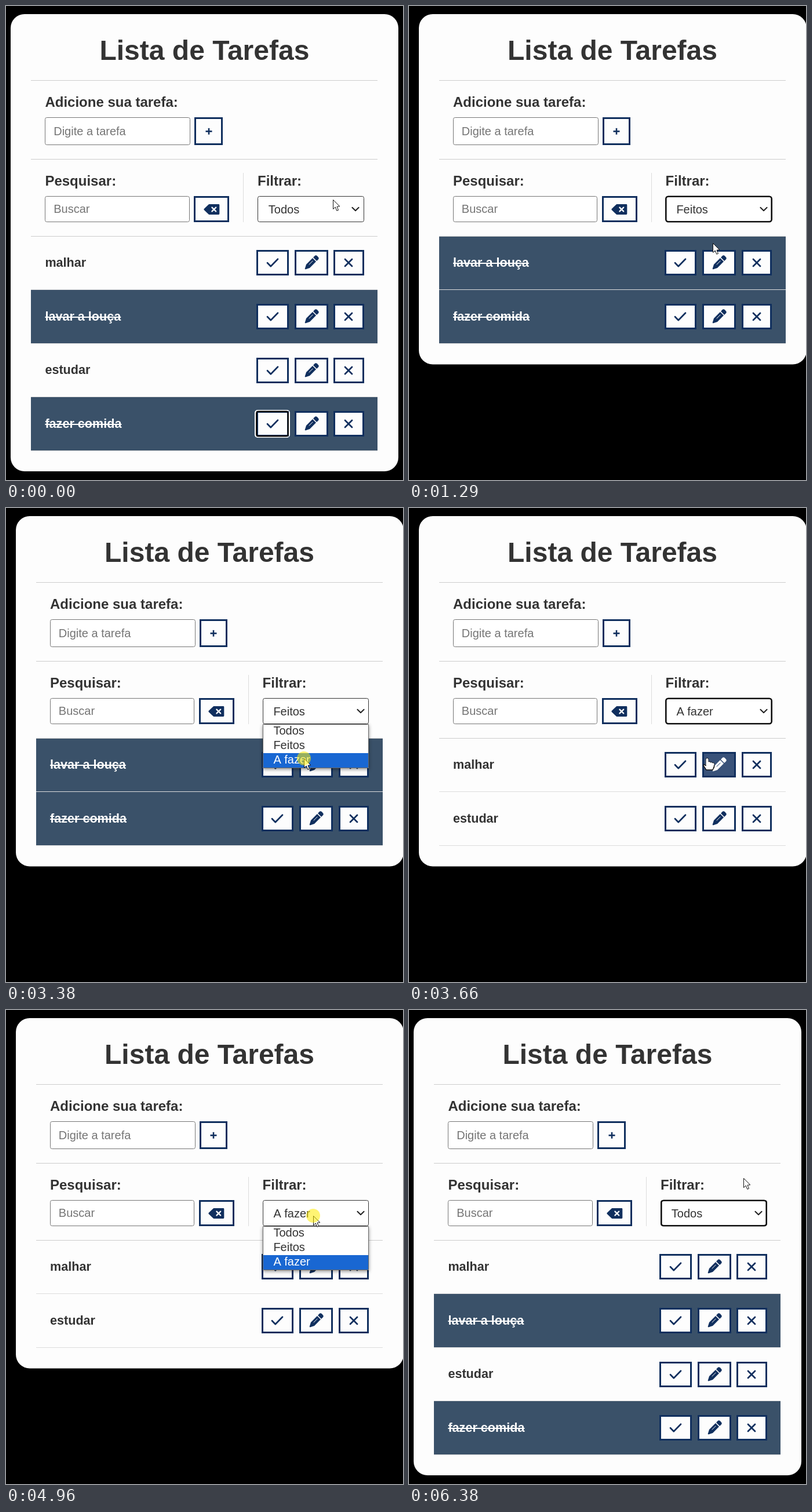
These frames come from a looping animation (685 by 818 pixels, 6.98 s). An HTML page with a canvas:

```html
<!DOCTYPE html>
<html lang="pt-BR">
<head>
<meta charset="utf-8">
<title>Lista de Tarefas</title>
<style>
  html, body { margin: 0; width: 100%; height: 100%; overflow: hidden; background: #000; }
  canvas { display: block; }
</style>
</head>
<body>
<canvas id="stage" width="685" height="818"></canvas>
<script>
const ctx = document.getElementById('stage').getContext('2d');
const LOOP = 6980;
const NAVY = '#102f5e', PAPER = '#fdfdfd', INK = '#333', DONE = '#3a5169';
const FONT = '"Liberation Sans", Arial, sans-serif';
const FILTERS = ['Todos', 'Feitos', 'A fazer'];
const TASKS = [
  { name: 'malhar', done: false },
  { name: 'lavar a louça', done: true },
  { name: 'estudar', done: false },
  { name: 'fazer comida', done: true }
];

// Selected filter from a given time, and the spans in which things are visible.
const SELECTIONS = [[0, 0], [1290, 1], [3450, 2], [5890, 0]];
const MENU_OPEN = [[350, 1290], [2360, 3450], [4960, 5890]];
const CLICKS = [[350, 420], [1160, 1290], [2360, 2430], [3380, 3450], [4960, 5020], [5760, 5890]];
const HOVER_IN = 3450, HOVER_OUT = 4150, FADE = 400;

const START = { x: 564, y: 334 };
const MOVES = [
  { from: 70, to: 280, steps: 4, x: 556, y: 352 },
  { from: 420, to: 750, steps: 6, x: 538, y: 388 },
  { from: 820, to: 960, steps: 3, x: 524, y: 409 },
  { from: 1820, to: 2290, steps: 8, x: 533, y: 355 },
  { from: 2700, to: 3310, steps: 9, x: 514, y: 432 },
  { from: 4070, to: 4340, steps: 5, x: 529, y: 391 },
  { from: 4410, to: 4690, steps: 5, x: 530, y: 355 },
  { from: 5220, to: 5430, steps: 4, x: 527, y: 394 },
  { from: 5890, to: 6380, steps: 8, x: 577, y: 290 }
];

const within = (spans, t) => spans.some(([a, b]) => t >= a && t < b);
const clamp = v => Math.max(0, Math.min(1, v));
const ease = p => 1 - Math.pow(1 - clamp(p), 2.3);

function cursorAt(t) {
  let { x, y } = START;
  for (const m of MOVES) {
    if (t < m.from) break;
    const step = Math.floor((t - m.from) / (m.to - m.from) * (m.steps - 1) + 0.15) + 1;
    const p = clamp(step / m.steps);
    x += (m.x - x) * p;
    y += (m.y - y) * p;
  }
  return { x, y };
}

// The centred card moves sideways when the page scrollbar goes away.
let shift = 0;
const X = x => Math.round(x + shift);

function fill(x, y, r, b, color) {
  ctx.fillStyle = color;
  ctx.fillRect(X(x), y, X(r) - X(x), b - y);
}

function frame(x, y, r, b, width, color, radius = 0, bg) {
  const h = width / 2;
  ctx.beginPath();
  ctx.roundRect(X(x) + h, y + h, X(r) - X(x) - width, b - y - width, radius);
  if (bg) { ctx.fillStyle = bg; ctx.fill(); }
  ctx.lineWidth = width;
  ctx.strokeStyle = color;
  ctx.stroke();
}

function text(str, x, y, size, color = INK, weight = 'normal', align = 'left') {
  ctx.font = `${weight} ${size}px ${FONT}`;
  ctx.textAlign = align;
  ctx.fillStyle = color;
  ctx.fillText(str, x + shift, y);
}

function trace(points, close) {
  ctx.beginPath();
  points.forEach(([x, y]) => ctx.lineTo(x, y));
  if (close) ctx.closePath();
}

function lines(width, color, ...paths) {
  ctx.lineWidth = width;
  ctx.strokeStyle = color;
  ctx.lineCap = ctx.lineJoin = 'round';
  for (const p of paths) { trace(p); ctx.stroke(); }
  ctx.lineCap = 'butt';
  ctx.lineJoin = 'miter';
}

function at(x, y, draw) {
  ctx.save();
  ctx.translate(x, y);
  draw();
  ctx.restore();
}

const checkIcon = color => lines(2.7, color, [[-9, 0.3], [-3.2, 6.2], [9, -6.2]]);
const crossIcon = (color, r = 6, w = 2.8) =>
  lines(w, color, [[-r, -r], [r, r]], [[r, -r], [-r, r]]);

function pencilIcon(color, bg) {
  ctx.rotate(Math.PI / 4);
  ctx.fillStyle = color;
  ctx.beginPath();
  ctx.roundRect(-4.3, -15.2, 8.6, 6.6, [3, 3, 0, 0]);
  ctx.fill();
  trace([[-4.3, -7], [4.3, -7], [4.3, 8.4], [0.7, 15.4], [-0.7, 15.4], [-4.3, 8.4]], true);
  ctx.fill();
  lines(0.9, bg, [[-0.6, -3.5], [-0.6, 5]]);
}

function backspaceIcon() {
  const body = [[-12.3, 0], [-4.5, -7.6], [12, -7.6], [12, 7.6], [-4.5, 7.6], [-12.3, 0]];
  lines(2.6, NAVY, body);
  trace(body, true);
  ctx.fillStyle = NAVY;
  ctx.fill();
  at(3.8, 0, () => crossIcon(PAPER, 3.4, 2.2));
}

function header() {
  text('Lista de Tarefas', 342.4, 93, 48, INK, 'bold', 'center');
  for (const y of [128, 264, 397]) fill(43.4, y, 641.4, y + 1, '#ccc');
  fill(409.4, 288, 410.4, 373, '#ddd');

  text('Adicione sua tarefa:', 67.4, 174, 24, INK, 'bold');
  frame(67.4, 192, 318.2, 240, 1, '#767676', 3, '#fff');
  text('Digite a tarefa', 82.2, 223, 20, '#757575');
  frame(325, 192, 373.6, 240, 3, NAVY, 0, PAPER);
  at(X(349.6), 216, () => {
    ctx.fillStyle = NAVY;
    ctx.fillRect(-5.5, -1, 11, 2.6);
    ctx.fillRect(-1.3, -5.2, 2.6, 11);
  });

  text('Pesquisar:', 67.4, 310, 24, INK, 'bold');
  frame(67.4, 328, 316.8, 373, 1, '#767676', 3, '#fff');
  text('Buscar', 82.2, 357, 20, '#757575');
  frame(324, 328, 385.2, 373, 3, NAVY, 0, PAPER);
  at(X(354.8), 351, backspaceIcon);

  text('Filtrar:', 434, 310, 24, INK, 'bold');
}

function selectBox(label, focused) {
  frame(434, 328, 617.8, 373, 1, '#333', 3, '#fff');
  if (focused) frame(433.6, 327.5, 618.2, 373.5, 2.6, '#101010', 4);
  text(label, 452.8, 358, 20);
  at(X(603.4), 350.5, () => lines(2, '#222', [[-5.6, -2.8], [0, 2.8], [5.6, -2.8]]));
}

function menu(active) {
  ctx.save();
  ctx.shadowColor = 'rgba(0,0,0,.45)';
  ctx.shadowBlur = 6;
  ctx.shadowOffsetY = 2;
  fill(434, 373, 617.4, 449, '#fff');
  ctx.restore();
  frame(434, 373, 617.4, 449, 1, '#666');
  FILTERS.forEach((name, i) => {
    const y = 374 + Math.round(24.7 * i);
    if (i === active) fill(435, y, 616.4, y + 25, '#1967d2');
    text(name, 452.8, 391 + 25 * i, 20, i === active ? '#fff' : INK);
  });
}

function taskRow(task, i, hover, hovered, focusRing) {
  const bottom = Math.floor(489.9 + 92.5 * i);
  const top = i ? Math.floor(397.4 + 92.5 * i) + 1 : 398;
  if (task.done) fill(43.4, top, 641.4, bottom, DONE);
  fill(43.4, bottom, 641.4, bottom + 1, '#ddd');

  const base = Math.round(450 + 92.6 * i);
  text(task.name, 67.4, base, 21.6, task.done ? PAPER : INK, 'bold');
  if (task.done) {
    const width = ctx.measureText(task.name).width;
    ctx.fillRect(67.4 + shift, base - 7, width, 2);
  }

  const y = Math.round(421.4 + 92.6 * i), b = y + 44, mid = y + 22;
  if (focusRing) {
    frame(429.4, y - 2, 490.4, b + 2, 2, '#fff', 4, '#fff');
  }
  frame(432, y, 487.8, b, 3, NAVY, 0, PAPER);
  if (focusRing) frame(431.4, y - 0.5, 488.4, b + 0.5, 2.6, '#101010', 3);
  at(X(459.8), mid, () => checkIcon(NAVY));

  frame(497.6, y, 555.8, b, 3, NAVY, 0, PAPER);
  if (hover > 0) {
    ctx.globalAlpha = hover;
    fill(500.6, y + 3, 552.8, b - 3, NAVY);
    ctx.globalAlpha = 1;
  }
  at(X(526.6), mid, () => pencilIcon(hovered ? '#fff' : NAVY, hovered ? NAVY : PAPER));

  frame(565, y, 617.8, b, 3, NAVY, 0, PAPER);
  at(X(591.4), mid, () => crossIcon(NAVY));
}

function arrowCursor() {
  trace([[0.5, 0.5], [0.5, 16.5], [4.2, 13], [6.8, 19.3], [9.5, 18.2], [7, 12.2], [11.8, 11.8]], true);
  ctx.fillStyle = '#fff';
  ctx.fill();
  ctx.lineWidth = 1;
  ctx.strokeStyle = '#111';
  ctx.stroke();
}

function handCursor() {
  ctx.beginPath();
  ctx.roundRect(-1.5, 0, 4, 14, 2);
  ctx.roundRect(2, 6, 4, 9, 2);
  ctx.roundRect(5.5, 7, 4, 9, 2);
  ctx.roundRect(9, 8, 3.5, 9, 2);
  ctx.lineWidth = 1.4;
  ctx.strokeStyle = '#111';
  ctx.stroke();
  ctx.fillStyle = '#fff';
  ctx.fill();
  trace([[-1.5, 13], [-5, 10.5], [-6, 12.5], [-1, 20], [10, 20], [12.5, 14], [12.5, 12]]);
  ctx.fill();
  ctx.stroke();
}

function clickSpot() {
  ctx.beginPath();
  ctx.arc(0, 0, 12, 0, Math.PI * 2);
  ctx.fillStyle = 'rgba(255,235,0,.55)';
  ctx.fill();
}

function render(t) {
  const selected = SELECTIONS.filter(([from]) => t >= from).pop()[1];
  const open = within(MENU_OPEN, t);
  const narrow = t >= 1290 && t < 5890;
  const hovered = t >= HOVER_IN && t < HOVER_OUT;
  const hover = t < HOVER_IN ? 0
    : hovered ? ease((t - HOVER_IN) / FADE)
    : 1 - ease((t - HOVER_OUT) / FADE);
  const cursor = cursorAt(t);
  const tasks = TASKS.filter(k => selected === 0 || k.done === (selected === 1));

  shift = narrow ? 8.6 : 0;
  ctx.fillStyle = '#000';
  ctx.fillRect(0, 0, 685, 818);
  ctx.fillStyle = PAPER;
  ctx.beginPath();
  ctx.roundRect(X(8), 14, 669, (narrow ? 618.5 : 803) - 14, 24);
  ctx.fill();

  header();
  tasks.forEach((task, i) =>
    taskRow(task, i, i === 0 ? hover : 0, i === 0 && hovered, t < 350 && i === 3));
  selectBox(FILTERS[selected], !open && t >= 1290);
  if (open) {
    const under = Math.floor((cursor.y - 374) / 24.7);
    menu(under >= 0 ? Math.min(2, under) : selected);
  }

  at(cursor.x, cursor.y, () => {
    if (hovered) handCursor(); else arrowCursor();
    if (within(CLICKS, t)) clickSpot();
  });
}

const begin = performance.now();
function tick() {
  render((performance.now() - begin) % LOOP);
  requestAnimationFrame(tick);
}
tick();
</script>
</body>
</html>
```
